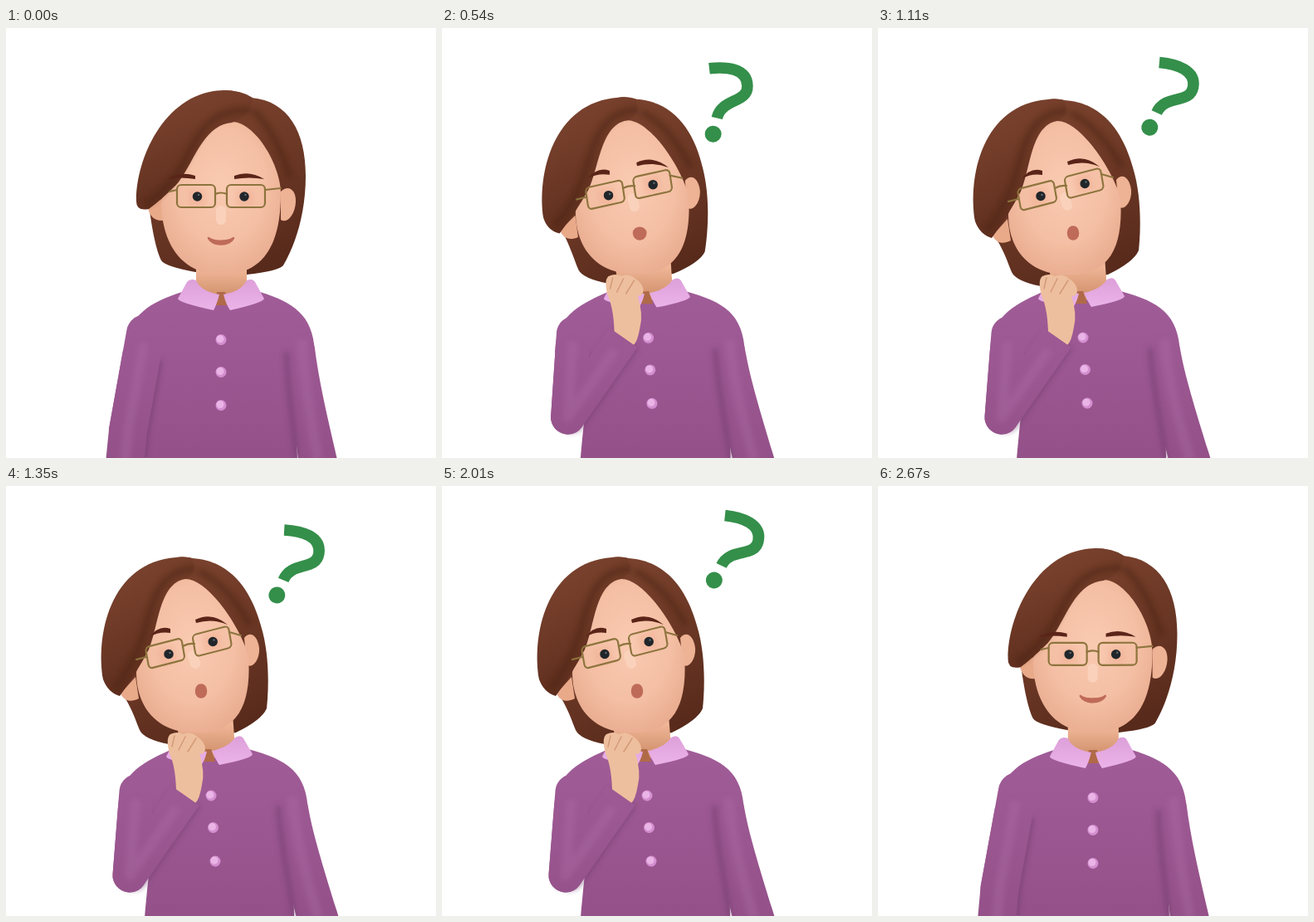
Recreate the animation shown at these times as an HTML page. Size 518 by 518 pixels, loop 2700 ms.

```html
<!DOCTYPE html>
<html lang="en">
<head>
<meta charset="utf-8">
<title>Thinking</title>
<style>
html, body { margin: 0; width: 100%; height: 100%; overflow: hidden; background: #fff; }
svg { display: block; width: 518px; height: 518px; }
.line { fill: none; stroke-linecap: round; stroke-linejoin: round; }
.soft { fill: none; filter: url(#blur); }
.sleeve { fill: none; stroke-linejoin: round; }
</style>
</head>
<body>
<!-- d is the resting pose, data-to the thinking pose -->
<svg viewBox="0 0 518 518">
  <defs>
    <filter id="blur" filterUnits="userSpaceOnUse" x="0" y="0" width="518" height="518"><feGaussianBlur stdDeviation="3"/></filter>
    <linearGradient id="hair" x1=".2" y1="0" x2=".6" y2="1"><stop stop-color="#7d4530"/><stop offset=".55" stop-color="#6b3725"/><stop offset="1" stop-color="#582a1b"/></linearGradient>
    <radialGradient id="skin" cx=".5" cy=".42" r=".62"><stop stop-color="#f9cab1"/><stop offset=".6" stop-color="#f4bfa4"/><stop offset="1" stop-color="#e9ac90"/></radialGradient>
    <linearGradient id="neck" x1="0" y1="0" x2="0" y2="1"><stop offset=".2" stop-color="#f0b798"/><stop offset="1" stop-color="#cb8963"/></linearGradient>
    <linearGradient id="wool" gradientUnits="userSpaceOnUse" x1="0" y1="320" x2="0" y2="518"><stop stop-color="#a05c97"/><stop offset="1" stop-color="#945189"/></linearGradient>
    <linearGradient id="collar" x1="0" y1="0" x2="0" y2="1"><stop stop-color="#dda0da"/><stop offset="1" stop-color="#ebb3e8"/></linearGradient>
  </defs>

  <g class="head">
    <path fill="url(#hair)" d="M171 205C176 245 181 268 187 280Q191 287 228 294L290 297Q328 293 334 286C348 262 361 225 361 178C361 125 340 88 296 84Q280 75 262 75L200 130L171 205Z"
      data-to="M140 250C151 266 156 282 161 294Q166 305 196 311L277 297Q308 282 314 268C317 240 317 200 307 168C296 128 272 90 225 87Q218 85 205 86L150 160L140 250Z"/>
  </g>
  <path fill="url(#neck)" d="M229 280L229 315Q258 345 290 315L290 280Z" data-to="M204 280L211 315Q243 345 276 315L273 275Z"/>

  <path fill="url(#wool)" d="M212 318C175 330 146 345 145 388L176 400C176 440 169 480 165 520L351 520C350 480 345 440 344 400L372 390C370 345 345 330 306 318L290 312Q258 345 229 312Z"
    data-to="M198 318C160 335 135 350 135 392L178 400C176 440 170 480 167 520L347 520C347 480 342 440 336 400L364 392C362 345 340 330 292 317L276 312Q243 345 211 312Z"/>
  <path fill="url(#wool)" d="M340 362C372 365 371 378 374 400C380 440 390 480 399 520L352 520C348 480 339 440 337 400Z"
    data-to="M330 365C352 350 362 372 365 392C371 425 388 478 401 520L350 520C342 490 334 440 328 400Z"/>
  <path class="soft" stroke="#6b3867" stroke-width="6" opacity=".5" d="M338 390C338 430 347 480 350 520" data-to="M328 385C330 430 342 480 347 520"/>
  <path class="soft" stroke="#ac6ca4" stroke-width="12" opacity=".4" d="M356 375C360 430 368 480 376 520" data-to="M345 375C350 430 364 480 376 520"/>

  <path fill="#b06a48" d="M254 318L250 334L268 334L264 318Z" data-to="M240 317L236 332L252 332L247 317Z"/>
  <path fill="url(#collar)" d="M229 304Q222 301 218 306L207 326Q208 331 250 340Q254 333 257 321Q234 317 229 304Z" data-to="M211 304Q205 301 203 306L193 326Q194 331 235 336Q239 332 242 320Q217 317 211 304Z"/>
  <path fill="url(#collar)" d="M290 304Q297 301 300 306L311 326Q310 331 270 340Q265 333 262 321Q284 317 290 304Z" data-to="M276 303Q283 299 286 304L297 323Q297 328 257 336Q252 329 248 319Q268 315 276 303Z"/>
  <path class="line" stroke="#d48fd0" stroke-width="13" d="M259 375.500L259 375.500M259 414.500L259 414.500M259 454.500L259 454.500" data-to="M247 373L247 373M249.500 411.500L249.500 411.500M252 452L252 452"/>
  <path class="line" stroke="#eab4e7" stroke-width="9" d="M258 374.500L258 374.500M258 413.500L258 413.500M258 453.500L258 453.500" data-to="M246 372L246 372M248.500 410.500L248.500 410.500M251 451L251 451"/>

  <g class="head">
    <path fill="#eeb294" d="M331 197C340 188 350 195 349 210C348 226 338 236 331 231Z" data-to="M287 183C294 174 303 180 305 195C306 210 296 221 290 215Z"/>
    <path fill="#e9aa8a" d="M190 205L170 212C172 226 178 233 190 232Z" data-to="M156 230L138 250C142 259 150 261 160 256Z"/>
    <path fill="url(#skin)" d="M187 208C187 258 210 297 260 297C312 297 331 258 331 200C331 165 300 113 272 113C230 113 200 165 187 208Z"
      data-to="M157 225C157 267 183 297 226 297C280 300 296 262 292 205C285 175 245 112 216 112C180 112 165 180 157 225Z"/>
    <path class="soft" stroke="#eda488" stroke-width="20" opacity=".35" d="M220 205L240 205M278 205L298 205" data-to="M184 207L204 202M238 190L258 185"/>
    <path class="line" stroke="#fad2bc" stroke-width="12" d="M259 220L259 231" data-to="M225 204L228 214"/>

    <path fill="url(#hair)" d="M157 209C156 160 190 77 262 75Q284 75 297 84Q296 105 272 114C236 117 226 165 205 189Q186 208 172 218Q157 221 157 209Z"
      data-to="M117 233C108 180 125 92 205 86Q214 84 224 87Q232 104 216 112C184 117 184 170 172 197Q158 224 137 253Q123 249 117 233Z"/>
    <path class="soft" stroke="#47200f" stroke-width="9" opacity=".4" d="M295 99C250 97 235 120 215 160Q200 190 168 212M298 99Q325 125 342 180" data-to="M228 100C190 100 178 130 168 170Q155 215 130 244M232 102Q268 120 294 168"/>

    <path fill="#5a2418" d="M194 182Q210 172 228 178L228 182Q210 179 194 182Z" data-to="M173 182Q184 167 198 172L198 177Q184 175 173 182Z"/>
    <path fill="#5a2418" d="M275 178Q293 171 311 182Q293 179 275 182Z" data-to="M228 161Q248 151 267 167Q248 159 229 165Z"/>
    <path class="line" stroke="#20262a" stroke-width="11.500" d="M230.500 203L230.500 203M287 203L287 203" data-to="M196 202.500L196 202.500M249.200 187.500L249.200 187.500"/>
    <path class="line" stroke="#5d6970" stroke-width="2.500" d="M232 201L232 201M288.500 201L288.500 201" data-to="M197.500 201L197.500 201M250.500 185.500L250.500 185.500"/>
    <path fill="#bf6b59" stroke="#bf6b59" stroke-width="2.500" stroke-linejoin="round" d="M244 253C250 258 268 258 274 253C270 263 248 263 244 253Z" data-to="M229 247C229 237 241 237 241 247C241 257 229 257 229 247Z"/>
    <g class="line" stroke="#8d743d" stroke-width="2.200">
      <g id="lenses"><rect x="-53" y="-13.500" width="46" height="27" rx="5"/><rect x="7" y="-13.500" width="46" height="27" rx="5"/></g>
      <path d="M197 197L206 195M312 195L331 193M252 200Q259 197 266 200" data-to="M157 209L169 206M269 176L283 180M213 193Q220 189 227 190"/>
    </g>
  </g>

  <path id="shade" class="sleeve soft" stroke="#6b3867" opacity=".5"/>
  <g id="hand">
    <path id="palm" fill="#eebf9e"/>
    <path id="fingers" class="line" stroke="#d39a78" stroke-width="1.500"/>
  </g>
  <path id="upper" class="line" stroke="url(#wool)"/>
  <path id="sleeve" class="sleeve" stroke="url(#wool)"/>
  <path id="shine" class="sleeve soft" stroke="#ac6ca4" stroke-width="12" opacity=".4"/>

  <g id="mark">
    <path fill="none" stroke="#348f4a" stroke-width="13.500" d="M-3 -79C18 -81 42.500 -78 42.500 -57C42.500 -36 11 -43 5 -19"/>
    <circle r="10" fill="#348f4a"/>
  </g>
</svg>
<script>
const LOOP = 2700;
const $ = id => document.getElementById(id);
const lerp = (a, b, k) => a + (b - a) * k;
const clamp = x => Math.min(1, Math.max(0, x));
const ease = (t, from, to) => { const x = clamp((t - from) / (to - from)); return x * x * (3 - 2 * x); };

function set(id, attributes) {
  for (const name in attributes) $(id).setAttribute(name, attributes[name]);
}

// Blends two path strings that share the same commands.
function mix(a, b, k) {
  const to = b.match(/-?[\d.]+/g);
  let i = 0;
  return a.replace(/-?[\d.]+/g, n => lerp(+n, +to[i++], k).toFixed(2));
}

const parts = [...document.querySelectorAll('[data-to]')]
  .map(el => ({ el, from: el.getAttribute('d'), to: el.dataset.to }));
const headGroups = document.querySelectorAll('.head');

// Elbow x, y and wrist x, y from hanging to chin.
const armPoses = [[147, 485, 138, 575], [131, 485, 152, 525], [140, 482, 192, 466], [149, 469, 216, 373]];
const palm = [
  'M177 470Q176 445 184 432Q187 412 197 401Q212 397 220 404Q221 412 206 411Q206 417 218 423Q228 414 240 412Q246 413 222 440Q213 465 198 482Z',
  'M205 372Q205 340 197 322Q192 304 198 299Q207 295 213 299Q222 295 229 301Q240 308 240 317Q238 325 233 322Q240 345 236 360Q233 378 228 382Z'];
const fingers = ['M192 419L208 418M186 431L212 434M183 443L205 447', 'M203 301L200 314M216 302L208 318M229 304L219 320'];

function drawArm(lift, lean) {
  const i = Math.min(2, Math.floor(lift));
  const fist = clamp(lift - 2);
  const shift = 20 * (1 - lean) * fist;
  const pose = armPoses[i].map((v, j) => lerp(v, armPoses[i + 1][j], lift - i));
  const ex = pose[0] + shift, ey = pose[1], wx = pose[2] + shift, wy = pose[3];
  const sx = lerp(168, 157, lean), sy = 368;
  const upperAt = k => `M${lerp(sx, ex, k)} ${lerp(sy, ey, k)}L${ex} ${ey}`;
  const forearmTo = k => `L${lerp(ex, wx, k)} ${lerp(ey, wy, k)}`;
  const width = lerp(46, 41, lift / 3);

  set('upper', { d: upperAt(0), 'stroke-width': width });
  set('sleeve', { d: upperAt(.2) + forearmTo(1), 'stroke-width': width });
  set('shade', { d: upperAt(.25) + forearmTo(.97), 'stroke-width': width - 2, transform: 'translate(4 -1)' });
  set('shine', { d: upperAt(.1) + forearmTo(.85) });
  set('palm', { d: mix(...palm, fist) });
  set('fingers', { d: mix(...fingers, fist) });
  set('hand', { transform: `translate(${wx - lerp(192, 216, fist)} ${wy - lerp(466, 373, fist)})` });
}

function drawHead(lean) {
  const rise = -8 * lean * (1 - lean);
  for (const group of headGroups) group.setAttribute('transform', `translate(0 ${rise})`);
  set('lenses', { transform: `translate(${lerp(259, 220, lean)} ${lerp(202.5, 194.3, lean)})
    rotate(${-10 * lean}) skewY(${-4.5 * lean}) scale(${1 - .03 * lean})` });
}

function drawMark(t) {
  const wave = Math.cos((t - 900) / 1110 * 2 * Math.PI);
  const size = ease(t, 270, 500) * (1 - ease(t, 2085, 2235));
  const turn = 10 + 1.7 * wave - 30 * (1 - ease(t, 270, 720));
  set('mark', { transform: `translate(${327 + wave * .8} ${123.3 - 9.8 * wave}) rotate(${turn}) scale(${size})` });
}

function draw(t) {
  const lean = ease(t, 0, 700) * (1 - ease(t, 2200, 2700));
  const lift = 3 * ease(t, 0, 520) * (1 - ease(t, 2210, 2700));
  for (const { el, from, to } of parts) el.setAttribute('d', mix(from, to, lean));
  drawHead(lean);
  drawArm(lift, lean);
  drawMark(t);
}

const start = performance.now();
function tick() {
  draw((performance.now() - start) % LOOP);
  requestAnimationFrame(tick);
}
tick();
</script>
</body>
</html>
```
